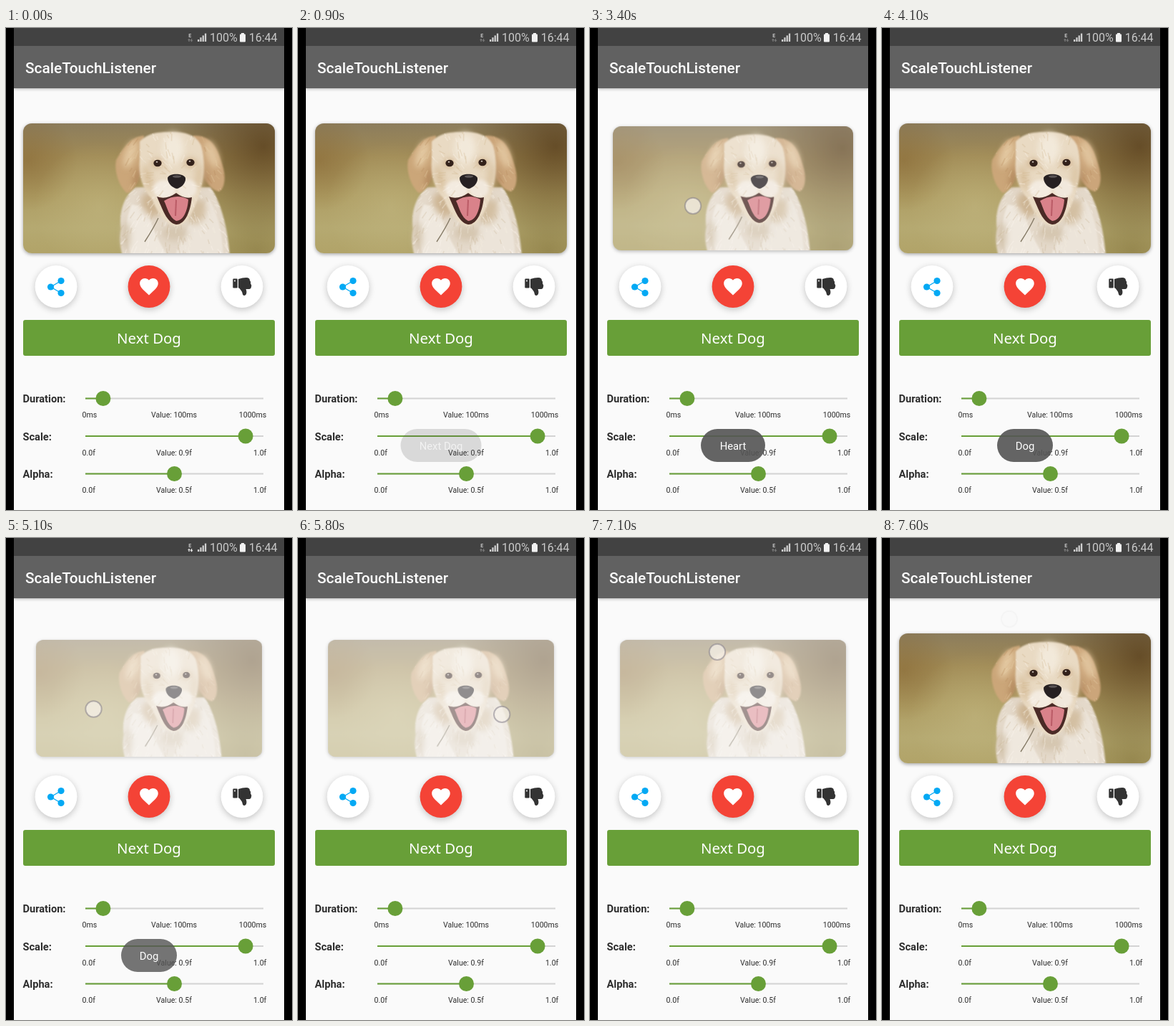
An HTML page with a canvas that plays this animation: 400x672 px, repeating every 8000 ms.

```html
<!DOCTYPE html>
<html lang="en">
<head>
<meta charset="utf-8">
<title>ScaleTouchListener</title>
<style>
html, body { margin: 0; width: 100%; height: 100%; overflow: hidden; background: #000; }
canvas { display: block; }
</style>
</head>
<body>
<canvas id="stage" width="400" height="672"></canvas>
<script>
const ctx = document.getElementById('stage').getContext('2d');
const LOOP = 8000, STEP = 100;
const GREEN = '#689f38', INK = '#2d2d2d';
const PHOTO = { x: 24, y: 133, w: 352, h: 181 };

const clamp = v => Math.max(0, Math.min(1, v));
const lerp = (a, b, k) => a + (b - a) * k;
const ease = v => 0.5 - 0.5 * Math.cos(Math.PI * clamp(v));

const presses = {
  button: { down: 450, up: 700 },
  heart: { down: 1940, up: 2031 },
  tap: { down: 3353, up: 3550 },
  drag: { down: 4950, up: 7270 }
};
const toasts = [
  { text: 'Next Dog', w: 113, show: 800, hide: 2055 },
  { text: 'Heart', w: 90, show: 2250, hide: 3600 },
  { text: 'Dog', w: 78, show: 3650, hide: 5055 }
];
// Finger contacts: [time, x, y] points, then lift time
const touches = [
  { path: [[450, 202, 432]], lift: 700 },
  { path: [[1900, 199, 353]], lift: 2018 },
  { path: [[3353, 144, 248]], lift: 3550 },
  { path: [[4950, 122, 238], [5250, 123, 239], [5850, 288, 246], [6300, 172, 222],
           [6500, 180, 201], [6750, 178, 196], [7500, 178, 113]], lift: 7508 }
];

function pressed(t, { down, up }) {
  return ease((t - down) / 100) - ease((t - up) / 100);
}

function pathAt(path, t) {
  const i = path.findIndex(p => p[0] > t);
  if (i < 0) return path[path.length - 1].slice(1);
  if (i === 0) return path[0].slice(1);
  const a = path[i - 1], b = path[i], k = ease((t - a[0]) / (b[0] - a[0]));
  return [lerp(a[1], b[1], k), lerp(a[2], b[2], k)];
}

function box(x, y, w, h, r, color, c = ctx) {
  c.fillStyle = color;
  c.beginPath();
  c.roundRect(x, y, w, h, r);
  c.fill();
}

function oval(x, y, rx, ry, color, c = ctx, turn = 0) {
  c.fillStyle = color;
  c.beginPath();
  c.ellipse(x, y, rx, ry, turn, 0, 7);
  c.fill();
}

function shape(d, color, c = ctx) {
  c.fillStyle = color;
  c.fill(new Path2D(d));
}

function text(s, x, y, font, color, align = 'left') {
  ctx.font = font;
  ctx.fillStyle = color;
  ctx.textAlign = align;
  ctx.fillText(s, x, y);
}

function shadow(blur, dy, alpha) {
  ctx.shadowColor = `rgba(0,0,0,${alpha})`;
  ctx.shadowBlur = blur;
  ctx.shadowOffsetY = dy;
}
const noShadow = () => shadow(0, 0, 0);

function scaled(cx, cy, p, draw) {
  const s = 1 - 0.1 * p;
  ctx.save();
  ctx.globalAlpha = 1 - 0.5 * p;
  ctx.translate(cx, cy);
  ctx.scale(s, s);
  ctx.translate(-cx, -cy);
  draw();
  ctx.restore();
}

function glow(c, x, y, r, rgb, alpha) {
  const g = c.createRadialGradient(x, y, 0, x, y, r);
  g.addColorStop(0, `rgba(${rgb},${alpha})`);
  g.addColorStop(1, `rgba(${rgb},0)`);
  c.fillStyle = g;
  c.fillRect(0, 100, 400, 250);
}

function randomizer(seed) {
  return () => (seed = seed * 16807 % 2147483647) / 2147483647;
}

// Soft hairs that fan out from (cx, cy), kept inside the outline
function fur(c, outline, cx, cy, count, colors) {
  const rnd = randomizer(count);
  c.save();
  c.clip(new Path2D(outline));
  c.lineWidth = 1.6;
  c.globalAlpha = 0.3;
  for (let i = 0; i < count; i++) {
    const x = 150 + rnd() * 165, y = 140 + rnd() * 178;
    const angle = Math.atan2(y - cy, x - cx) + (rnd() - 0.5) * 0.7, len = 5 + rnd() * 7;
    c.strokeStyle = colors[i % colors.length];
    c.beginPath();
    c.moveTo(x, y);
    c.lineTo(x + len * Math.cos(angle), y + len * Math.sin(angle));
    c.stroke();
  }
  c.restore();
}

function paintBackdrop(c) {
  const sky = c.createLinearGradient(0, 133, 0, 315);
  [[0, '#8c7d5d'], [0.25, '#a08a55'], [0.55, '#ae9d63'], [0.8, '#b5a971'], [1, '#b1a368']]
    .forEach(s => sky.addColorStop(...s));
  c.fillStyle = sky;
  c.fillRect(24, 133, 352, 182);
  glow(c, 360, 165, 130, '84,58,24', 0.75);
  glow(c, 30, 185, 70, '132,98,46', 0.5);
  glow(c, 130, 250, 90, '196,185,132', 0.5);
  glow(c, 350, 310, 100, '128,113,58', 0.55);
}

function paintBody(c) {
  const outline = 'M182 222C166 232 157 256 161 280C158 294 160 306 163 318H313C311 288 303 246 286 222Z';
  c.filter = 'blur(1.2px)';
  shape(outline, '#e4d9ca', c);
  shape('M176 246C164 272 168 300 176 318H226C211 292 202 274 197 250Z', '#efe8de', c);
  shape('M284 238C300 266 302 292 304 318H236L254 278Z', '#ece4d9', c);
  c.filter = 'blur(5px)';
  oval(203, 246, 13, 18, '#cdb594', c, -0.5);
  oval(267, 256, 12, 18, '#d3bfa2', c, 0.3);
  oval(236, 286, 18, 11, '#d5c6b0', c);
  oval(168, 290, 5, 20, '#cfbfa6', c);
  c.filter = 'blur(.6px)';
  fur(c, outline, 236, 190, 420, ['#fffaf2', '#c9b597', '#f5ede2']);
}

function paintEars(c) {
  const left = 'M193 150C174 151 163 169 154 184C151 200 158 221 169 230C180 228 187 209 193 186Z';
  const right = 'M262 150C285 149 295 165 301 186C309 207 306 224 298 228C283 225 274 206 269 184Z';
  const tones = ['#e9cfa9', '#b58a5c', '#dcb88b'];
  c.filter = 'blur(1px)';
  shape(left, '#cba679', c);
  shape(right, '#cba57a', c);
  c.filter = 'blur(4px)';
  oval(174, 176, 8, 20, '#e2c7a0', c, 0.35);
  oval(288, 176, 8, 20, '#e0c49d', c, -0.35);
  oval(184, 208, 4, 14, '#ac8157', c, 0.3);
  oval(277, 206, 4, 14, '#ac8259', c, -0.3);
  c.filter = 'blur(.6px)';
  fur(c, left + right, 232, 90, 260, tones);
}

function paintHead(c) {
  const outline = 'M187 158C202 143 222 145 234 145C252 145 267 150 273 164C279 184 277 207 273 222C266 248 255 275 239 276C222 275 211 255 204 238C191 224 185 205 187 183Z';
  c.filter = 'blur(1px)';
  shape(outline, '#e9dac3', c);
  c.filter = 'blur(5px)';
  oval(234, 168, 15, 22, '#f2e9da', c);
  oval(198, 209, 6, 18, '#d8c09d', c, -0.2);
  oval(270, 207, 5, 18, '#d9c2a0', c, 0.1);
  oval(211, 189, 9, 6, '#cfb18a', c);
  oval(258, 188, 9, 6, '#cfb18a', c);
  c.filter = 'blur(2px)';
  oval(222, 225, 16, 13, '#f3ebe0', c);
  oval(253, 224, 14, 13, '#f1e8dc', c);
  c.filter = 'blur(.6px)';
  fur(c, outline, 237, 208, 240, ['#fff9ee', '#cfb58f', '#f3e8d6']);
}

function paintFace(c) {
  c.filter = 'blur(.7px)';
  shape('M211 235Q224 240 238 230Q250 239 260 236C258 255 251 274 238 274C224 271 219 252 211 235Z', '#4a2a26', c);
  shape('M221 241Q238 230 255 239C254 255 248 269 238 269C228 264 226 251 221 241Z', '#d9828a', c);
  shape('M237 239L239 240L238 262L236 262Z', '#ba5b66', c);

  for (const [x, y] of [[212, 188.5], [258, 187.5]]) {
    oval(x, y, 5.6, 4.8, '#33211a', c);
    oval(x - 1, y - 1.8, 1.3, 1, '#cfc4bb', c);
  }
  shape('M226 209C228 202 248 202 251 209C252 217 244 223 239 224C233 223 226 217 226 209Z', '#262022', c);
  oval(239, 207, 6, 1.8, '#5a5455', c);

  // Blade of grass
  c.filter = 'none';
  c.strokeStyle = '#857a66';
  c.lineWidth = 1.4;
  c.stroke(new Path2D('M213 265Q207 278 194 298'));
}

function paintPhoto() {
  const canvas = document.createElement('canvas');
  canvas.width = PHOTO.w;
  canvas.height = PHOTO.h;
  const c = canvas.getContext('2d');
  c.beginPath();
  c.roundRect(0, 0, PHOTO.w, PHOTO.h, 12);
  c.clip();
  c.translate(-PHOTO.x, -PHOTO.y);
  [paintBackdrop, paintBody, paintEars, paintHead, paintFace].forEach(paint => paint(c));
  return canvas;
}
const photo = paintPhoto();

function statusBar(t) {
  const lit = t >= 4300 && t < 5300;
  box(11, 0, 378, 25, 0, '#424242');
  text('E', 257.3, 13, 'bold 7px Roboto, sans-serif', '#c6c6c6', 'center');
  shape('M254 17L256 14.5L258 17H256.7V19H255.3V17Z', lit ? '#d8d8d8' : '#777');
  shape('M257.5 17L259.5 19.5L261.5 17H260.2V15H258.8V17Z', lit ? '#f2f2f2' : '#777');
  for (let i = 0; i < 4; i++) {
    const h = 3 + i * 2.8;
    box(268 + i * 3.3, 19 - h, 2.3, h, 0, '#d0d0d0');
  }
  text('100%', 285, 19, '16px Roboto, sans-serif', '#c9c9c9');
  box(329, 7, 4, 2, 0, '#f2f2f2');
  box(327, 8.5, 8, 11, 1, '#f2f2f2');
  text('16:44', 379.5, 19, '16px Roboto, sans-serif', '#c9c9c9', 'right');
}

function appBar() {
  shadow(4, 1, 0.3);
  box(11, 25, 378, 59, 0, '#616161');
  noShadow();
  text('ScaleTouchListener', 27, 63, '500 20.8px Roboto, sans-serif', '#fff');
}

function drawPhoto(p) {
  const { x, y, w, h } = PHOTO;
  scaled(x + w / 2, y + h / 2, p, () => {
    // Shadow only outside the card, so the faded photo stays clear
    ctx.save();
    const outside = new Path2D();
    outside.rect(0, 90, 400, 270);
    outside.roundRect(x, y, w, h, 12);
    ctx.clip(outside, 'evenodd');
    shadow(5, 1.5, 0.35);
    box(x, y, w, h, 12, '#aaa');
    ctx.restore();
    ctx.drawImage(photo, x, y);
  });
}

function disc(x, color) {
  shadow(10, 2.5, 0.22);
  oval(x, 360.5, 29.4, 29.4, color);
  noShadow();
}

function roundButtons(p) {
  const blue = '#03a9f4';
  disc(70, '#fff');
  ctx.strokeStyle = blue;
  ctx.lineWidth = 1.3;
  ctx.stroke(new Path2D('M77 352.5L62.5 361L77 369.5'));
  [[62.5, 361], [77, 352.5], [77, 369.5]].forEach(([x, y]) => oval(x, y, 4.6, 4.6, blue));

  scaled(200, 360.5, p, () => {
    disc(200, '#f44336');
    ctx.translate(184.6, 345.2);
    ctx.scale(1.28, 1.28);
    shape('M12 21.35L10.55 20.03C5.4 15.36 2 12.28 2 8.5C2 5.42 4.42 3 7.5 3C9.24 3 10.91 3.81 12 5.09C13.09 3.81 14.76 3 16.5 3C19.58 3 22 5.42 22 8.5C22 12.28 18.6 15.36 13.45 20.04Z', '#fff');
  });

  disc(330, '#fff');
  box(317.3, 349.5, 6.5, 13, 1.2, '#333');
  oval(320, 352.6, 1, 1, '#fff');
  shape('M325 350Q331 348 336 348Q341 348 341 352Q343 354 342 356Q344 359 343 361Q342.5 364 340 364H335.5C337 367 337 373 333 373C330.5 373 331 369 329.5 367Q326.5 362.5 325 362.3Z', '#333');
}

function nextButton(p) {
  scaled(200, 432, p, () => {
    box(24, 407, 352, 50, 3, GREEN);
    text('Next Dog', 200, 440, '500 20.4px "Noto Sans", sans-serif', '#fff', 'center');
  });
}

function slider(y, name, k, min, value, max) {
  const x = lerp(111, 360, k), small = '10.6px Roboto, sans-serif';
  text(name, 23.5, y + 5.5, 'bold 14.6px Roboto, sans-serif', INK);
  box(111, y - 1, 249, 2, 0, '#d3d3d3');
  box(111, y - 1, x - 111, 2, 0, GREEN);
  oval(x, y, 10.5, 10.5, GREEN);
  text(min, 106.5, y + 26.5, small, INK);
  text('Value: ' + value, 235, y + 26.5, small, INK, 'center');
  text(max, 364.3, y + 26.5, small, INK, 'right');
}

function drawToast(t, { text: label, w, show, hide }) {
  const alpha = clamp((t - show) / 450) - clamp((t - hide) / 450);
  if (alpha <= 0) return;
  ctx.globalAlpha = alpha * 0.9;
  box(200 - w / 2, 559, w, 46, 23, '#555');
  ctx.globalAlpha = clamp(alpha * 3);
  text(label, 200, 588, '14.8px Roboto, sans-serif', '#fff', 'center');
  ctx.globalAlpha = 1;
}

function drawTouch(t, { path, lift }) {
  const alpha = 1 - clamp((t - lift) / 100);
  if (t < path[0][0] || alpha <= 0) return;
  const [x, y] = pathAt(path, t);
  ctx.globalAlpha = alpha;
  oval(x, y, 11, 11, 'rgba(246,240,232,.75)');
  ctx.strokeStyle = 'rgba(135,130,140,.55)';
  ctx.lineWidth = 2;
  ctx.beginPath();
  ctx.arc(x, y, 11.2, 0, 7);
  ctx.stroke();
  ctx.globalAlpha = 1;
}

function draw(t) {
  box(0, 0, 400, 672, 0, '#000');
  ctx.save();
  ctx.beginPath();
  ctx.rect(11, 0, 378, 672);
  ctx.clip();
  box(11, 0, 378, 672, 0, '#fafafa');
  appBar();
  statusBar(t);
  drawPhoto(pressed(t, presses.tap) + pressed(t, presses.drag));
  roundButtons(pressed(t, presses.heart));
  nextButton(pressed(t, presses.button));
  slider(516.5, 'Duration:', 0.1, '0ms', '100ms', '1000ms');
  slider(569, 'Scale:', 0.9, '0.0f', '0.9f', '1.0f');
  slider(621.5, 'Alpha:', 0.5, '0.0f', '0.5f', '1.0f');
  toasts.forEach(toast => drawToast(t, toast));
  touches.forEach(touch => drawTouch(t, touch));
  ctx.restore();
}

const start = performance.now();
function tick() {
  const t = (performance.now() - start) % LOOP;
  draw(Math.floor(t / STEP) * STEP);
  requestAnimationFrame(tick);
}
tick();
</script>
</body>
</html>
```
